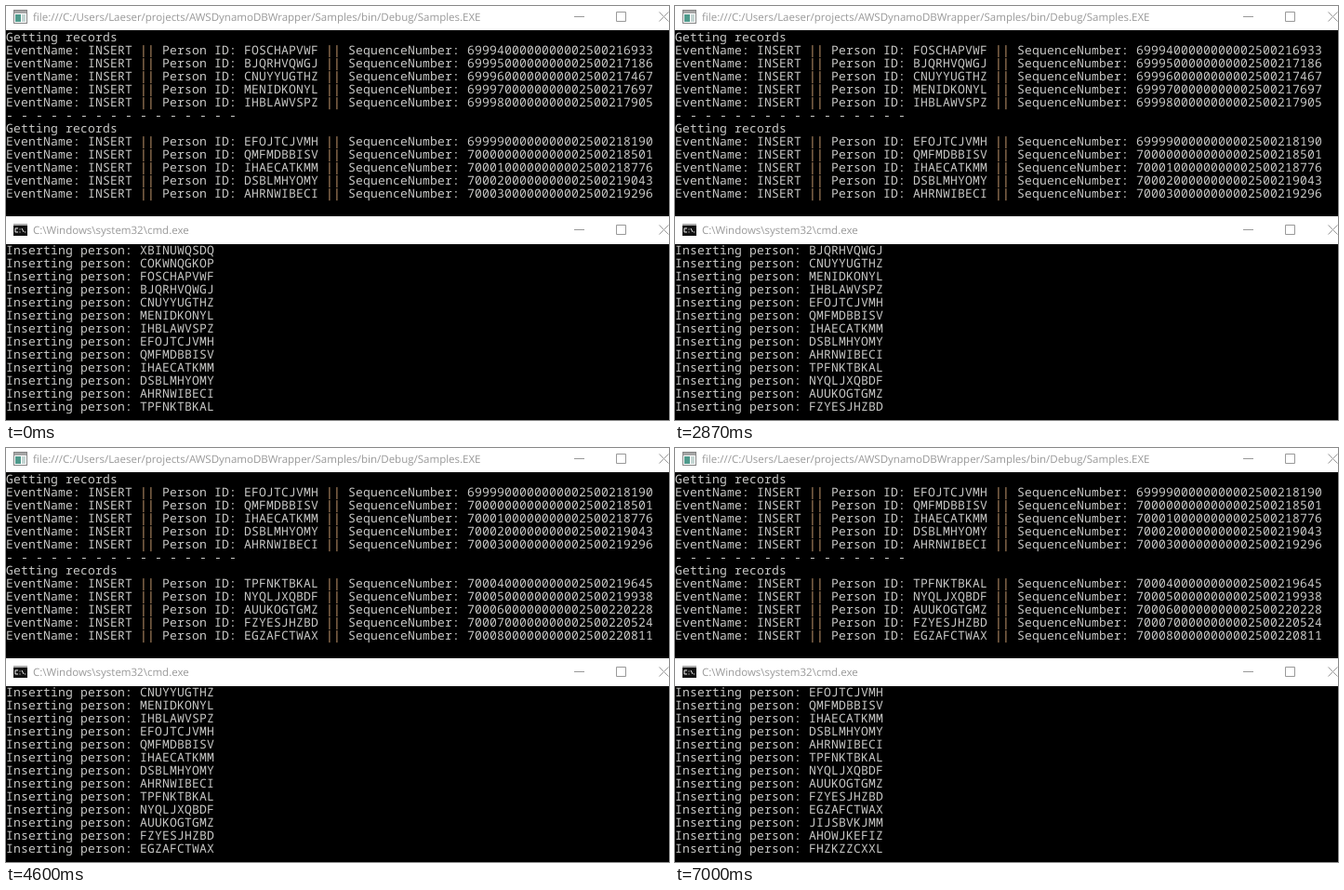
These frames come from a looping animation (713x445 px, 8000 ms). An HTML page:

```html
<!DOCTYPE html>
<html lang="en">
<head>
<meta charset="utf-8">
<title>Stream console</title>
<style>
  html, body { margin: 0; width: 100%; height: 100%; overflow: hidden; background: #000; }
  svg { display: block; }
  text { text-rendering: geometricPrecision; white-space: pre; }
  .log { font: 13px "Noto Sans Mono", monospace; letter-spacing: .2px; fill: #c8c8c6; }
  .pipe { fill: #cda074; }
  .title { font: 11.5px "Open Sans", "Noto Sans", sans-serif; fill: #999; }
  .buttons { fill: none; stroke: #999; }
</style>
</head>
<body>
<svg width="713" height="445" viewBox="0 0 713 445">
  <defs>
    <g id="buttons" class="buttons">
      <path d="M611 11.5h11M656.5 6.5h10v10h-10z"/>
      <path d="M702.5 6.5l10 10m0-10l-10 10"/>
    </g>
  </defs>

  <rect width="713" height="26" fill="#fff"/>
  <g>
    <rect x="8.5" y="4.5" width="14" height="14" fill="#fff" stroke="#858585"/>
    <rect x="9" y="5" width="13" height="3" fill="#a5a5a5"/>
    <rect x="10" y="9" width="6" height="8" fill="#4f9a8c"/>
    <rect x="17" y="9" width="4" height="8" fill="#c4d5d2"/>
  </g>
  <text class="title" x="29" y="16">file:///C:/Users/Laeser/projects/AWSDynamoDBWrapper/Samples/bin/Debug/Samples.EXE</text>
  <use href="#buttons"/>

  <rect y="226" width="713" height="30" fill="#fff"/>
  <g>
    <rect x="8" y="234" width="15" height="13" fill="#111"/>
    <rect x="8" y="234" width="15" height="2" fill="#aaa"/>
    <path d="M13 239h-3v4h3M15 239.5v1m0 2v1M17 239l2 4m1 0h1" fill="none" stroke="#eee"/>
  </g>
  <text class="title" x="29" y="245">C:\Windows\system32\cmd.exe</text>
  <use href="#buttons" y="229"/>

  <g id="reader" class="log"></g>
  <g id="writer" class="log"></g>
</svg>
<script>
  const LOOP = 8000, ROWS = 13, LINE = 14, BATCH = 5;

  const ids = `XBINUWQSDQ COKWNQGKOP FOSCHAPVWF BJQRHVQWGJ CNUYYUGTHZ
    MENIDKONYL IHBLAWVSPZ EFOJTCJVMH QMFMDBBISV IHAECATKMM
    DSBLMHYOMY AHRNWIBECI TPFNKTBKAL NYQLJXQBDF AUUKOGTGMZ
    FZYESJHZBD EGZAFCTWAX JIJSBVKJMM AHOWJKEFIZ FHZKZZCXXL`.split(/\s+/);

  const tails = [216933, 217186, 217467, 217697, 217905,
                 218190, 218501, 218776, 219043, 219296,
                 219645, 219938, 220228, 220524, 220811];

  const inserted = ids.map(id => `Inserting person: ${id}`);

  const received = [];
  tails.forEach((tail, i) => {
    if (i % BATCH === 0) {
      if (i) received.push("- ".repeat(16).trim());
      received.push("Getting records");
    }
    const seq = `${69994 + i}${"0".repeat(10)}2500${tail}`;
    received.push(`EventName: INSERT || Person ID: ${ids[i + 2]} || SequenceNumber: ${seq}`);
  });

  // Steps are [time, first visible line].
  const logs = [
    { id: "reader", lines: received, y: 38, steps: [[0, 0], [4140, 2], [4600, 7]] },
    { id: "writer", lines: inserted, y: 267,
      steps: [0, 720, 1750, 2870, 3870, 4910, 6000, 7000].map((t, i) => [t, i]) }
  ];

  function show(log, first) {
    if (log.first === first) return;
    log.first = first;
    document.getElementById(log.id).innerHTML = log.lines
      .slice(first, first + ROWS)
      .map((line, row) => {
        const body = line.replaceAll("||", '<tspan class="pipe">||</tspan>');
        return `<text x="0" y="${log.y + row * LINE}">${body}</text>`;
      })
      .join("");
  }

  function draw() {
    const t = performance.now() % LOOP;
    for (const log of logs) show(log, log.steps.findLast(([at]) => at <= t)[1]);
    requestAnimationFrame(draw);
  }
  draw();
</script>
</body>
</html>
```
